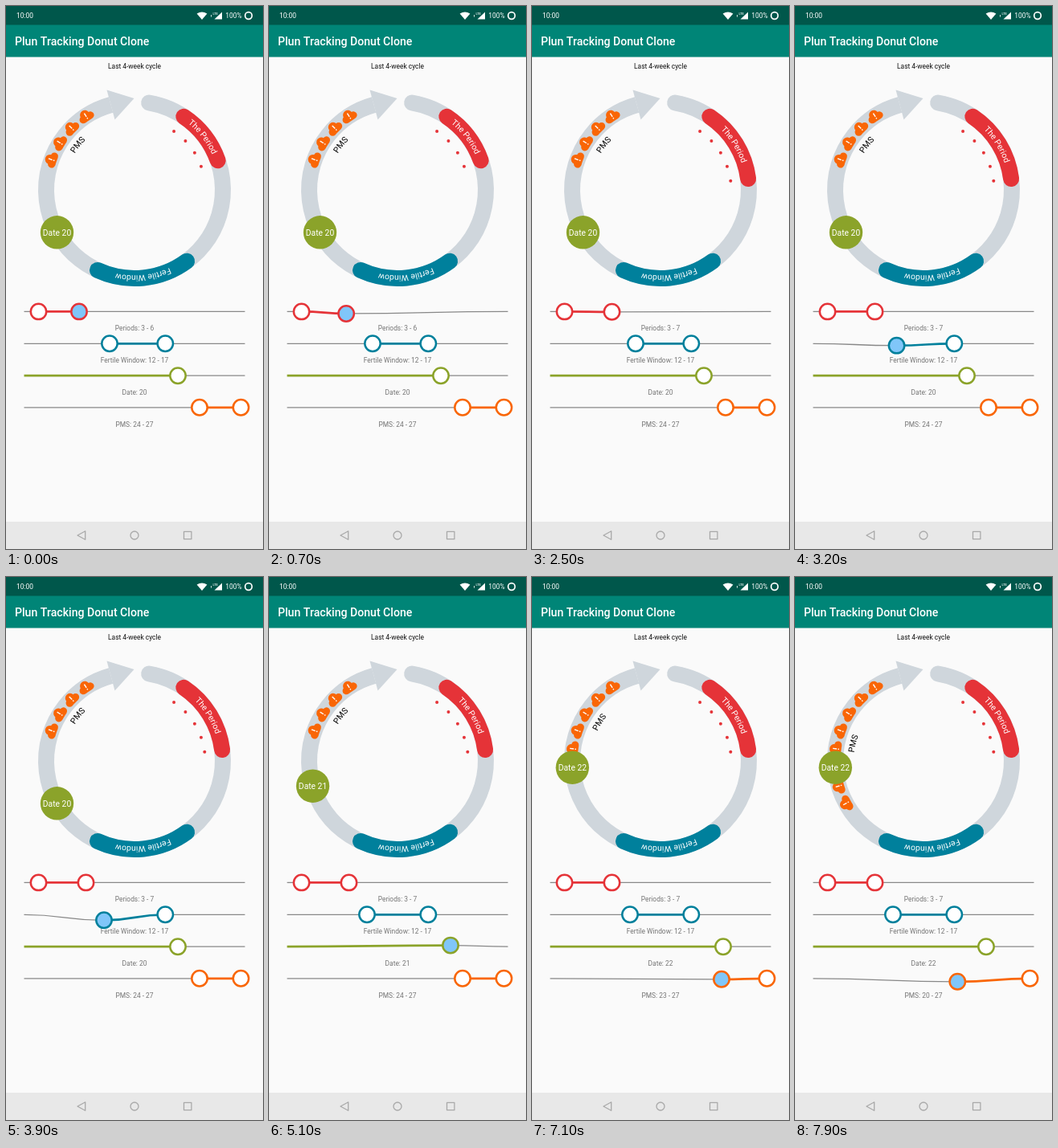
An HTML page with a canvas that plays this animation: 320 by 676 pixels, repeating every 8 s.

```html
<!DOCTYPE html>
<html lang="en">
<head>
<meta charset="utf-8">
<title>Cycle tracker</title>
<style>
  html, body { margin: 0; width: 100%; height: 100%; overflow: hidden; background: #fafafa; }
  canvas { display: block; width: 320px; height: 676px; }
</style>
</head>
<body>
<canvas id="stage"></canvas>
<script>
const W = 320, H = 676, LOOP = 8000, STEP = 100;
const CX = 160, CY = 229, R = 110;
const RED = '#e53338', TEAL = '#00809c', GREEN = '#8ba32a', ORANGE = '#f96606';
const GREY = '#888', RING = '#cfd6dc', TOUCH = '#80c6f9';
const FONT = 'Roboto, "Noto Sans", sans-serif';

const canvas = document.getElementById('stage');
const dpr = window.devicePixelRatio || 1;
canvas.width = W * dpr;
canvas.height = H * dpr;
const c = canvas.getContext('2d');

// Piecewise linear track: [time, value, time, value, ...]
function track(t, keys) {
  if (t <= keys[0]) return keys[1];
  for (let i = 2; i < keys.length; i += 2) {
    if (t <= keys[i]) {
      const k = (t - keys[i - 2]) / (keys[i] - keys[i - 2]);
      return keys[i - 1] + (keys[i + 1] - keys[i - 1]) * k;
    }
  }
  return keys[keys.length - 1];
}

// Vertical pull of a slider: follows the finger, then springs back
function pull(t, keys, release) {
  if (t < release) return track(t, keys);
  const s = (t - release) / 1000;
  return s > 0.7 ? 0 : track(release, keys) * Math.exp(-6 * s) * Math.cos(18 * s);
}

const low = x => Math.floor((x - 1) / 10);
const high = x => Math.floor((x - 29) / 9.7);
const dayAngle = d => (9.5 + 12.2 * (d - 1)) * Math.PI / 180;
const polar = (a, r) => [CX + r * Math.sin(a), CY - r * Math.cos(a)];

function text(str, x, y, size, color, align = 'left', weight = 400) {
  c.font = `${weight} ${size}px ${FONT}`;
  c.fillStyle = color;
  c.textAlign = align;
  c.fillText(str, x, y);
}

function disc(x, y, r, fill) {
  c.beginPath();
  c.arc(x, y, r, 0, Math.PI * 2);
  c.fillStyle = fill;
  c.fill();
}

function poly(points, fill) {
  c.beginPath();
  points.forEach(p => c.lineTo(p[0], p[1]));
  c.closePath();
  if (fill) {
    c.fillStyle = fill;
    c.fill();
  } else c.stroke();
}

function band(from, to, color, cap = 'round') {
  c.beginPath();
  c.arc(CX, CY, R, from - Math.PI / 2, to - Math.PI / 2);
  c.lineCap = cap;
  c.lineWidth = 20;
  c.strokeStyle = color;
  c.stroke();
}

function arcText(str, mid, r, color) {
  c.font = `400 10.4px ${FONT}`;
  c.fillStyle = color;
  c.textAlign = 'center';
  const total = c.measureText(str).width;
  for (let i = 0; i < str.length; i++) {
    const w = c.measureText(str[i]).width;
    const at = c.measureText(str.slice(0, i + 1)).width - w / 2;
    c.save();
    c.translate(CX, CY);
    c.rotate(mid + (at - total / 2) / r);
    c.fillText(str[i], 0, -r);
    c.restore();
  }
}

function cloud(day) {
  c.save();
  c.translate(CX, CY);
  c.rotate(dayAngle(day));
  c.translate(0, -R);
  disc(-5.3, 2, 4.7, ORANGE);
  disc(-0.5, -2, 6, ORANGE);
  disc(5.3, 2, 4.5, ORANGE);
  c.fillRect(-5, 0, 10, 6.6);
  c.fillStyle = '#fff';
  c.fillRect(-0.7, -4, 1.4, 5);
  c.fillRect(-0.7, 2.4, 1.4, 1.5);
  c.restore();
}

function statusBar() {
  c.fillStyle = '#00574b';
  c.fillRect(0, 0, W, 23.5);
  text('10:00', 13, 15.3, 8.4, '#fff');
  c.beginPath();
  c.moveTo(244, 17);
  c.lineTo(237.6, 9.6);
  c.quadraticCurveTo(244, 5.6, 250.4, 9.6);
  c.closePath();
  c.fillStyle = '#fff';
  c.fill();
  poly([[259.5, 16.5], [269, 16.5], [269, 7.5]], '#fff');
  text('LTE', 257.6, 10.5, 3.8, '#fff', 'left', 500);
  c.fillStyle = '#cde0dc';
  c.fillRect(255, 11, 1, 2.6);
  text('100%', 273.3, 15.3, 8.4, '#fff');
  c.beginPath();
  c.arc(302, 12, 4.3, 0, Math.PI * 2);
  c.lineWidth = 1.7;
  c.strokeStyle = '#fff';
  c.stroke();
}

function chrome() {
  c.fillStyle = '#fafafa';
  c.fillRect(0, 0, W, H);
  c.fillStyle = '#008577';
  c.fillRect(0, 23, W, 40.5);
  statusBar();
  text('Plun Tracking Donut Clone', 11, 49, 14.1, '#fff', 'left', 500);
  text('Last 4-week cycle', 160, 78, 8.4, '#111', 'center');

  c.fillStyle = '#e8e8e8';
  c.fillRect(0, 642, W, 34);
  c.strokeStyle = '#a9a9a9';
  c.lineWidth = 1.3;
  c.lineJoin = 'round';
  poly([[89, 659], [98.7, 653.7], [98.7, 664.3]]);
  c.beginPath();
  c.arc(160, 659, 5, 0, Math.PI * 2);
  c.stroke();
  c.strokeRect(221.5, 654.3, 9.4, 9.4);
}

function donut(period, fertile, date, pms) {
  const span = ([a, b]) => [dayAngle(a), dayAngle(b)];
  const middle = ([a, b]) => dayAngle((a + b) / 2);

  band(dayAngle(1), dayAngle(1) + 1, RING);
  band(dayAngle(1) + 0.5, 344.5 * Math.PI / 180, RING, 'butt');
  poly([[125.5, 104.5], [159.5, 115], [135.5, 141.5]], RING);

  band(...span(period), RED);
  for (let d = period[0]; d <= period[1]; d++) disc(...polar(dayAngle(d), 88), 2, RED);
  arcText('The Period', middle(period), 106.3, '#fff');

  band(...span(fertile), TEAL);
  arcText('Fertile Window', middle(fertile), 106.3, '#fff');

  for (let d = pms[0]; d <= pms[1]; d++) cloud(d);
  arcText('PMS', middle(pms), 87, '#000');

  const [x, y] = polar(dayAngle(date), R);
  disc(x, y, 20.7, GREEN);
  text('Date ' + date, x, y + 3.7, 10.3, '#fff', 'center');
}

function strand(a, b, color, width) {
  const mx = (a.x + b.x) / 2;
  c.beginPath();
  c.moveTo(a.x, a.y);
  c.bezierCurveTo(mx, a.y, mx, b.y, b.x, b.y);
  c.lineCap = 'butt';
  c.strokeStyle = color;
  c.lineWidth = width;
  c.stroke();
}

// One thumb fills the track from the left end; two fill the part between them
function slider(y, color, label, thumbs) {
  text(label, 160, y + 23.7, 8.4, '#757575', 'center');
  const knobs = thumbs.map(k => ({ x: k.x, y: y + (k.dy || 0), on: k.on }));
  const stops = [{ x: 22.5, y }, ...knobs, { x: 297.5, y }];
  const active = knobs.length - 1;
  for (let i = 0; i < stops.length - 1; i++) {
    if (i !== active) strand(stops[i], stops[i + 1], GREY, 1.3);
  }
  strand(stops[active], stops[active + 1], color, 2.7);
  for (const k of knobs) {
    disc(k.x, k.y, 9.7, k.on ? TOUCH : '#fff');
    c.lineWidth = 2.5;
    c.strokeStyle = color;
    c.stroke();
  }
}

function draw(t) {
  const p = {
    x: track(t, [100, 91, 800, 97, 1000, 97, 1500, 106, 1800, 104, 1900, 104, 2200, 99.5]),
    dy: pull(t, [100, 0, 800, 3, 1000, 3, 1500, 5.5, 1800, 4], 2200),
    on: t < 2200
  };
  const f = {
    x: track(t, [2900, 129, 3700, 122.5, 3900, 122]),
    dy: pull(t, [2900, 0, 3700, 6.3, 3900, 7], 4100),
    on: t >= 2900 && t < 4100
  };
  const d = {
    x: track(t, [4600, 214, 5100, 226, 5600, 238]),
    dy: pull(t, [4600, 0, 5100, -1.6, 5600, -2], 6500),
    on: t >= 4600 && t < 6500
  };
  const m = {
    x: track(t, [6900, 241, 7100, 236, 7300, 236, 7900, 202.3]),
    dy: track(t, [6900, 0, 7100, 1, 7300, 1, 7900, 4]),
    on: t >= 6900
  };
  const period = [3, high(p.x)];
  const fertile = [low(f.x), 17];
  const date = Math.round((d.x + 24) / 11.9);
  const pms = [low(m.x), 27];

  c.setTransform(dpr, 0, 0, dpr, 0, 0);
  chrome();
  donut(period, fertile, date, pms);
  slider(380.4, RED, 'Periods: ' + period.join(' - '), [{ x: 40.5 }, p]);
  slider(420.3, TEAL, 'Fertile Window: ' + fertile.join(' - '), [f, { x: 198.3 }]);
  slider(460.2, GREEN, 'Date: ' + date, [d]);
  slider(499.8, ORANGE, 'PMS: ' + pms.join(' - '), [m, { x: 292.5 }]);
}

const start = performance.now();
function tick() {
  const t = (performance.now() - start) % LOOP;
  draw(Math.floor(t / STEP) * STEP);
  requestAnimationFrame(tick);
}
tick();
</script>
</body>
</html>
```
